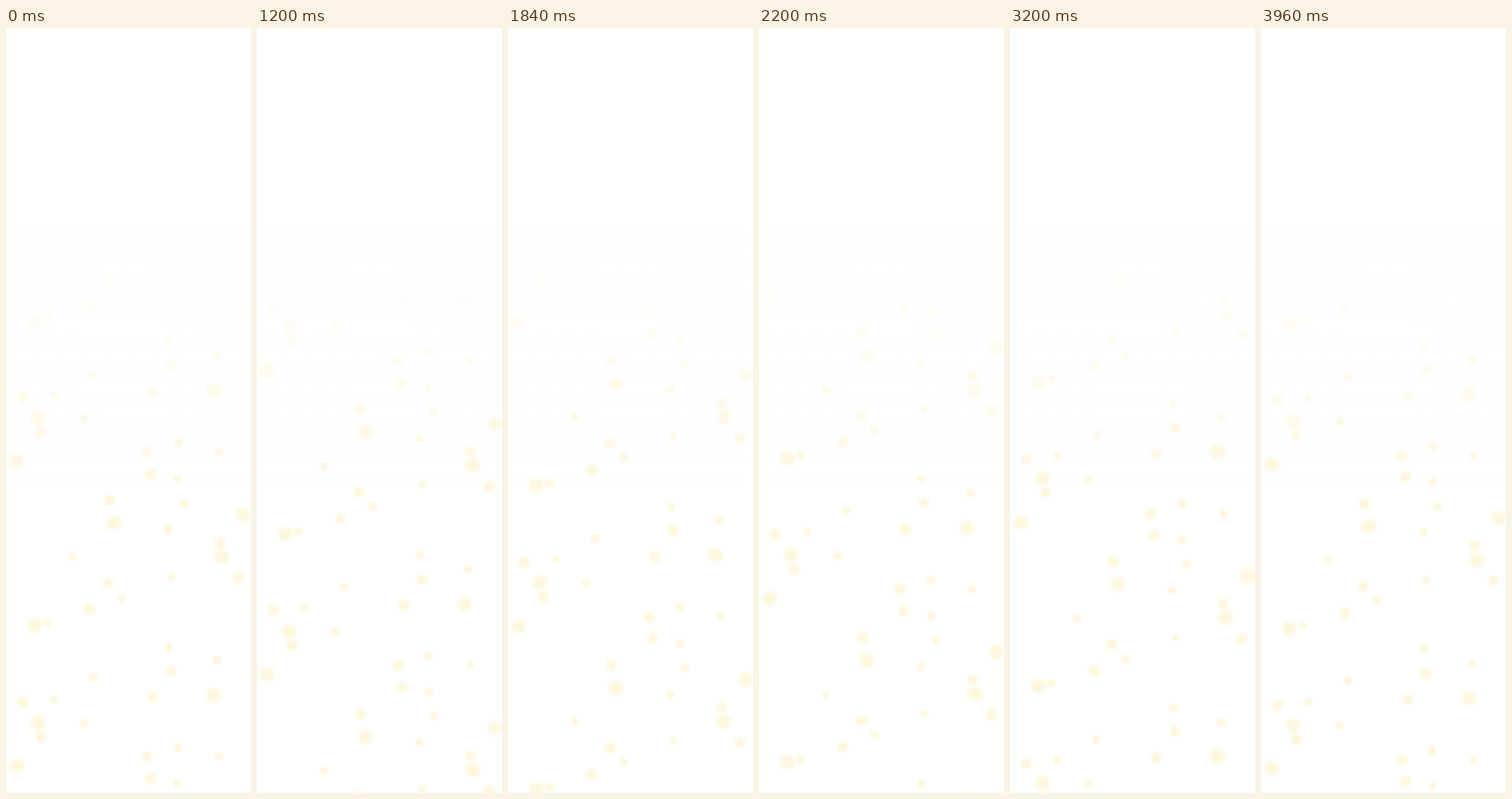
An HTML page that plays this animation: 327 px wide and 1018 px high, repeating every 4 s.

```html
<!DOCTYPE html>
<html lang="en">
<head>
<meta charset="utf-8">
<title>Rising lights</title>
<style>
  html, body { margin: 0; width: 100%; height: 100%; overflow: hidden; background: #fff; }
  svg { display: block; width: 327px; height: 1018px; }
</style>
</head>
<body>
<svg viewBox="0 0 327 1018">
  <defs>
    <radialGradient id="glow">
      <stop offset="0" stop-color="#ffd55a" stop-opacity=".22"/>
      <stop offset=".5" stop-color="#ffd55a" stop-opacity=".18"/>
      <stop offset="1" stop-color="#ffd55a" stop-opacity="0"/>
    </radialGradient>
    <linearGradient id="fade" x2="0" y2="1">
      <stop offset=".26" stop-color="#fff"/>
      <stop offset=".6" stop-color="#fff" stop-opacity="0"/>
    </linearGradient>
    <g id="tile" fill="url(#glow)"></g>
  </defs>
  <g id="field"></g>
  <rect width="327" height="1018" fill="url(#fade)"/>
</svg>
<script>
  const WIDTH = 327, TOP = 565, PERIOD = 405, LOOP = 4000, STEP = 40;
  const SMALL_COUNT = 14;

  // Anchor points of the prominent lights; the small ones are scattered
  const large = [[14, 577], [317, 648], [144, 659], [288, 704], [38, 795], [277, 888], [43, 924]];
  const medium = [
    [188, 565], [193, 594], [138, 629], [285, 685], [310, 732], [136, 739],
    [112, 774], [220, 855], [196, 890], [22, 897], [47, 943]
  ];

  let seed = 7;
  const random = () => (seed = seed * 16807 % 2147483647) / 2147483647;

  const add = (parent, name, attrs) => {
    const el = document.createElementNS("http://www.w3.org/2000/svg", name);
    for (const key in attrs) el.setAttribute(key, attrs[key]);
    parent.append(el);
  };

  const tile = document.getElementById("tile");
  const field = document.getElementById("field");
  const light = (cx, cy, r) => add(tile, "circle", { cx, cy, r });

  for (const [x, y] of large) light(x, y, 13);
  for (const [x, y] of medium) light(x, y, 10);
  for (let i = 0; i < SMALL_COUNT; i++) {
    const y = TOP + (i + random()) * PERIOD / SMALL_COUNT;
    light(20 + random() * (WIDTH - 40), y, 7 + random());
  }
  for (let k = -1; k <= 2; k++) add(field, "use", { href: "#tile", y: k * PERIOD });

  field.animate(
    { transform: ["translateY(0px)", `translateY(${-PERIOD}px)`] },
    { duration: LOOP, iterations: Infinity, easing: `steps(${LOOP / STEP}, end)` }
  );
</script>
</body>
</html>
```
